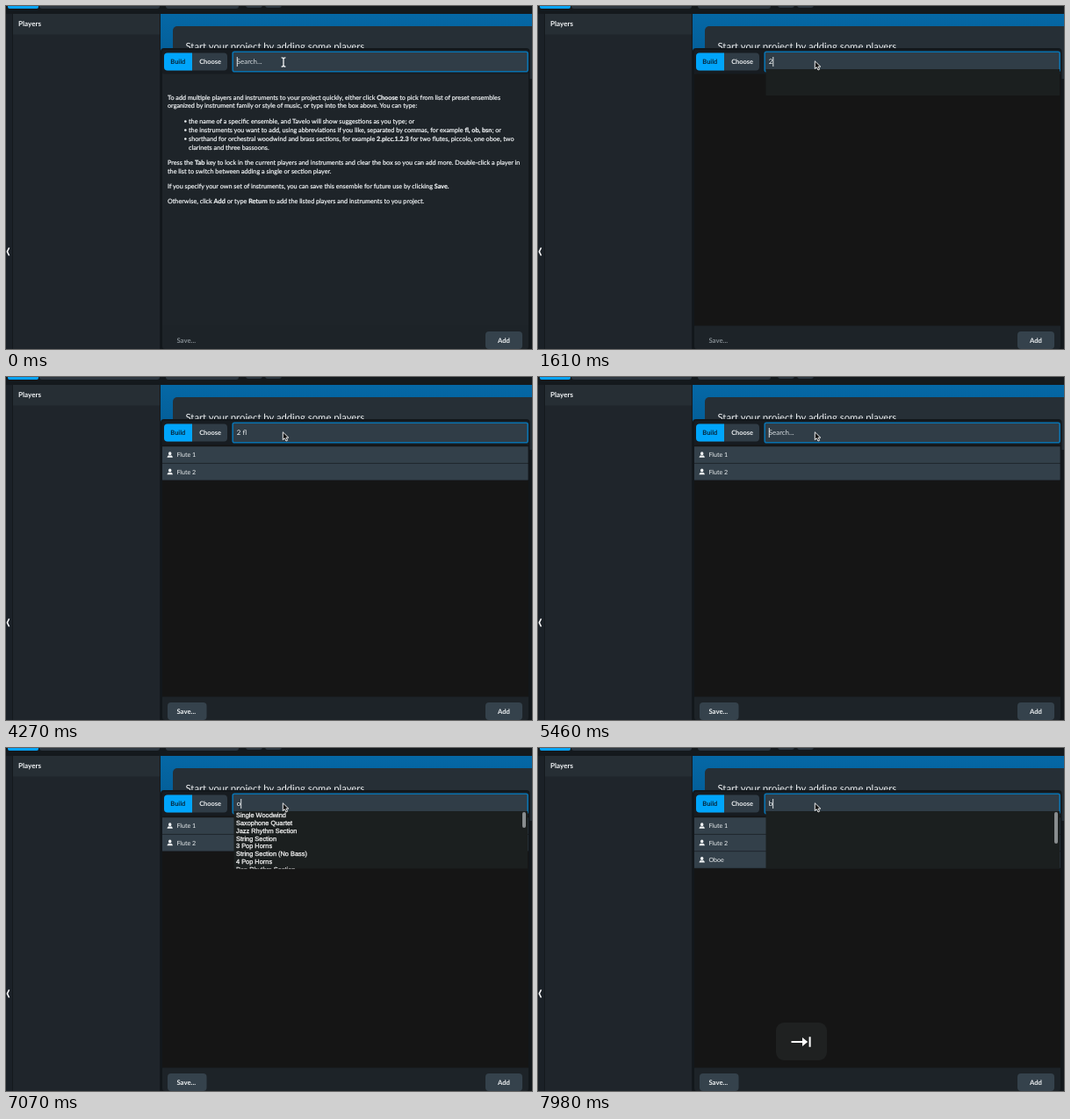
An HTML page for the animation above (8000 ms loop, 599x391 px).

```html
<!DOCTYPE html>
<html lang="en">
<head>
<meta charset="utf-8">
<title>Adding players</title>
<style>
html, body { margin: 0; width: 100%; height: 100%; overflow: hidden; background: #14191d; }
svg { display: block; width: 599px; height: 391px; }
text { font-family: Lato, "Open Sans", sans-serif; fill: #eef1f3; text-rendering: geometricPrecision; white-space: pre; }
.b { font-weight: 700; }
#help text { font-size: 7.24px; stroke: #eef1f3; stroke-width: .22; }
#list text { font: 7.4px "Liberation Sans", Arial, sans-serif; fill: #f4f4f4; stroke: #f4f4f4; stroke-width: .28; }
</style>
</head>
<body>
<svg viewBox="0 0 599 391">
  <defs>
    <linearGradient id="blue" x2="0" y2="1">
      <stop offset="0" stop-color="#0568a6"/><stop offset="1" stop-color="#045f99"/>
    </linearGradient>
    <clipPath id="listClip"><rect x="260" y="72" width="334" height="65.5"/></clipPath>
  </defs>

  <rect width="599" height="391" fill="#14191d"/>
  <g fill="#2d3740">
    <rect x="2" y="-6" width="35" height="9" rx="2" fill="#08a3f7"/>
    <rect x="38" y="-6" width="137" height="9" rx="3"/>
    <rect x="182" y="-6" width="83" height="9" rx="3"/>
    <rect x="273" y="-6" width="19" height="8" rx="3"/>
    <rect x="295" y="-6" width="19" height="8" rx="3"/>
  </g>

  <rect y="9" width="7" height="382" fill="#1b2127"/>
  <path d="M3.6 275.5L1.4 280L3.6 284.5" fill="none" stroke="#fff" stroke-width="1.6"/>
  <rect x="8" y="9" width="167" height="382" fill="#1f252b"/>
  <rect x="8" y="9" width="167" height="23.5" fill="#262e34"/>
  <text class="b" x="14" y="23.4" font-size="8.1">Players</text>

  <rect x="176" y="9" width="423" height="42" fill="url(#blue)"/>
  <rect x="190" y="23" width="420" height="60" rx="5" fill="#262f36"/>
  <text x="204.5" y="50" font-size="11.27">Start your project by adding some players</text>

  <rect x="176" y="48" width="420.5" height="350" rx="4" fill="#12171b"/>
  <rect x="178" y="50" width="417" height="341" rx="3" fill="#1d2328"/>
  <rect x="178" y="50" width="417" height="28" rx="3" fill="#171c21"/>
  <rect id="body" x="178" y="77.5" width="417" height="287"/>

  <rect x="180" y="53.5" width="72" height="20" rx="4" fill="#303c46"/>
  <path d="M184 53.5H212V73.5H184Q180 73.5 180 69.5V57.5Q180 53.5 184 53.5Z" fill="#00a5fb"/>
  <text class="b" x="187.3" y="66.2" font-size="7.45" style="fill:#06263a">Build</text>
  <text class="b" x="220.2" y="66.2" font-size="7.45">Choose</text>

  <rect x="258.2" y="52.2" width="336" height="22.6" rx="2" fill="#303d47" stroke="#0a72af" stroke-width="1.6"/>
  <text id="query" x="262.8" y="66.3" font-size="7.9"></text>
  <rect id="caret" y="58" width=".9" height="11" fill="#f2f5f7"/>

  <g id="help"></g>
  <g id="rows"></g>

  <rect id="saveBox" x="184" y="371" width="44.5" height="20" rx="4" fill="#35424c"/>
  <text id="save" class="b" x="194.4" y="383.9" font-size="7.75">Save...</text>
  <rect x="546" y="371" width="42" height="20" rx="4" fill="#35424c"/>
  <text class="b" x="560" y="383.9" font-size="7.65">Add</text>

  <g id="drop">
    <rect id="dropBox" x="259.5" y="72" width="334.5" fill="#1b1f1f"/>
    <g id="list" clip-path="url(#listClip)"></g>
    <rect id="thumb" x="588" y="73" width="4" rx="2" fill="#898d8f"/>
  </g>

  <g id="key">
    <rect x="271" y="313" width="58" height="43" rx="9" fill="#1f2121"/>
    <path d="M288.5 335H304M309.6 329.3V340.7" stroke="#fff" stroke-width="2" fill="none"/>
    <path d="M301 330L307.2 335L301 340Z" fill="#fff"/>
  </g>

  <path id="beam" d="M313.6 58.8Q316 58.8 316 60.5Q316 58.8 318.4 58.8M316 60.5V67.5M313.6 69.2Q316 69.2 316 67.5Q316 69.2 318.4 69.2" fill="none" stroke="#f4f6f7" stroke-width="1.3"/>
  <path id="arrow" d="M315.3 62.8V71.6L317.4 69.7L319 73L320.6 72.2L319.1 69.1H321.8Z" fill="#111" stroke="#fff" stroke-width=".9"/>
</svg>

<script>
const LOOP = 8000;
const NS = "http://www.w3.org/2000/svg";
const $ = id => document.getElementById(id);

function add(parent, tag, attrs, content = "") {
  const el = document.createElementNS(NS, tag);
  for (const k in attrs) el.setAttribute(k, attrs[k]);
  el.textContent = content;
  return parent.appendChild(el);
}

const show = (id, on) => $(id).setAttribute("visibility", on ? "visible" : "hidden");
const clamp = v => Math.max(0, Math.min(1, v));

// x, baseline, text; *bold* words, a leading dash is a bullet
const HELP = [
  [184, 106.7, "To add multiple players and instruments to your project quickly, either click *Choose* to pick from list of preset ensembles"],
  [184, 116.1, "organized by instrument family or style of music, or type into the box above. You can type:"],
  [208, 133.9, "-the name of a specific ensemble, and Tavelo will show suggestions as you type; or"],
  [208, 143.9, "-the instruments you want to add, using abbreviations if you like, separated by commas, for example *fl, ob, bsn*; or"],
  [208, 153.9, "-shorthand for orchestral woodwind and brass sections, for example *2.picc.1.2.3* for two flutes, piccolo, one oboe, two"],
  [208, 163.8, "clarinets and three bassoons."],
  [184, 180.9, "Press the *Tab* key to lock in the current players and instruments and clear the box so you can add more. Double-click a player in"],
  [184, 190.8, "the list to switch between adding a single or section player."],
  [184, 207.9, "If you specify your own set of instruments, you can save this ensemble for future use by clicking *Save.*"],
  [184, 225, "Otherwise, click *Add* or type *Return* to add the listed players and instruments to you project."]
];
for (const [x, y, line] of HELP) {
  if (line[0] === "-") add($("help"), "circle", { cx: 204.3, cy: y - 2.4, r: 1.3, fill: "#eef1f3" });
  const text = add($("help"), "text", { x, y });
  line.replace(/^-/, "").split("*").forEach((part, i) =>
    add(text, "tspan", i % 2 ? { class: "b" } : {}, part));
}

const rows = ["Flute 1", "Flute 2", "Oboe"].map((name, i) => {
  const g = add($("rows"), "g", { transform: `translate(178 ${79 + i * 19.4})` });
  add(g, "rect", { width: 416.5, height: 19.4, fill: "#1e272e" });
  add(g, "rect", { y: .4, width: 416.5, height: 18.5, fill: "#33404a" });
  add(g, "path", { d: "M8.7 6.2a1.75 2 0 1 1 0 4a1.75 2 0 1 1 0-4ZM5.5 12.8Q5.6 10.9 7.3 10.3L8.7 10.8L10.1 10.3Q11.8 10.9 11.9 12.8Z", fill: "#f0f3f5" });
  add(g, "text", { x: 16.4, y: 12.2, "font-size": 7.1 }, name);
  return g;
});

const LISTS = {
  two: { height: 30, thumb: 0, items: ["Brass: 4230", "Brass: 4231", "Brass: 4221"] },
  three: { height: 65.5, thumb: 58, items: ["3 Pop Horns", "3 Trumpets", "3 Trombones", "3 Trombones, Tuba", "Brass: 4230", "Brass: 8341", "Brass: 6341", "Brass: 4331"] },
  o: { height: 65.5, thumb: 18, items: ["Single Woodwind", "Saxophone Quartet", "Jazz Rhythm Section", "String Section", "3 Pop Horns", "String Section (No Bass)", "4 Pop Horns", "Pop Rhythm Section"] },
  b: { height: 65.5, thumb: 36, items: [] }
};
const lines = Array.from({ length: 8 }, (_, i) =>
  add($("list"), "text", { x: 262, y: 79.2 + i * 8.8 }));

// start time, typed text, suggestion list, player count
const STEPS = [
  [0, "", null, 0],
  [1610, "2", "two", 0],
  [1960, "2 ", null, 0],
  [2170, "2 f", null, 0],
  [2380, "2 fl", null, 2],
  [4380, "", null, 2],
  [6580, "3", "three", 2],
  [6900, "", null, 2],
  [7000, "o", "o", 2],
  [7210, "ob", null, 3],
  [7490, "", null, 3],
  [7980, "b", "b", 3]
];

function draw(t) {
  const [start, typed, listName, count] = STEPS.filter(s => s[0] <= t).pop();
  const intro = t < 1610;
  const age = t - start;

  show("help", intro);
  show("beam", intro);
  show("arrow", !intro);
  $("body").setAttribute("fill", intro ? "#1e2429" : "#151515");

  const query = $("query");
  query.textContent = typed || "Search...";
  query.style.fill = typed ? "#f2f5f7" : "#d3d9dd";
  const caretX = 262.8 + (typed ? query.getComputedTextLength() : 0);
  $("caret").setAttribute("x", caretX);
  show("caret", age % 1000 < 500);

  rows.forEach((row, i) => row.setAttribute("visibility", i < count ? "visible" : "hidden"));
  show("saveBox", count > 0);
  $("save").style.fill = count ? "#eef1f3" : "#828a90";

  const list = LISTS[listName];
  $("drop").setAttribute("display", list ? "inline" : "none");
  if (list) {
    $("dropBox").setAttribute("height", list.height);
    $("thumb").setAttribute("height", list.thumb);
    // the box opens empty and fills a moment later
    lines.forEach((line, i) => line.textContent = age >= 70 && list.items[i] || "");
  }

  const key = t < 7000
    ? clamp((t - 4340) / 70) * clamp((5400 - t) / 350)
    : clamp((t - 7420) / 70);
  $("key").setAttribute("opacity", key);
}

function tick() {
  draw(performance.now() % LOOP);
  requestAnimationFrame(tick);
}
tick();
</script>
</body>
</html>
```
